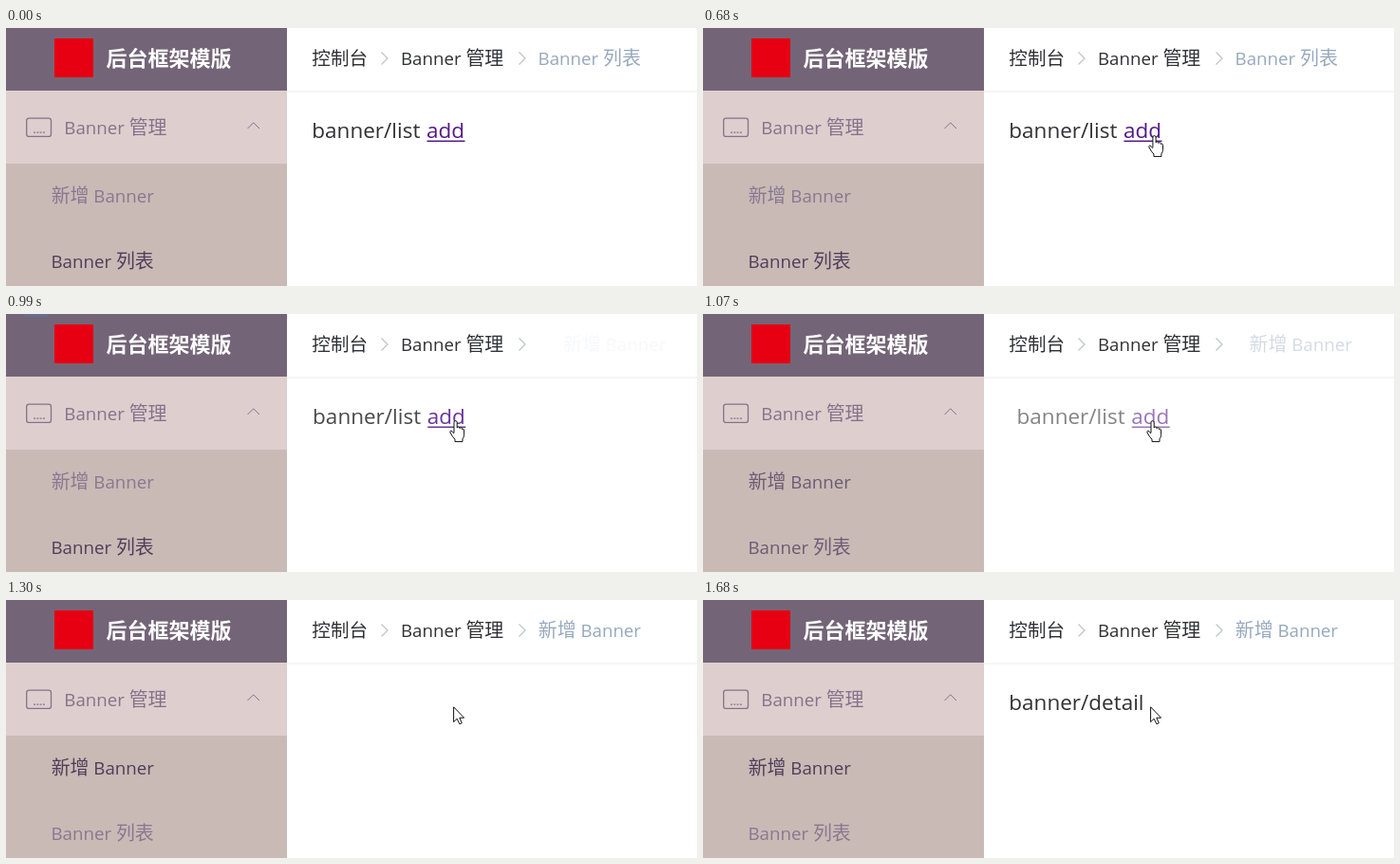
An HTML page that plays this animation: 728 px wide and 272 px high, repeating every 2.06 s.

```html
<!DOCTYPE html>
<html lang="zh">
<head>
<meta charset="utf-8">
<style>
  html, body { margin: 0; width: 100%; height: 100%; overflow: hidden; background: #fff; }
  svg { display: block; width: 728px; height: 272px; }
  text { font-family: "Open Sans", "Noto Sans", "Noto Sans CJK SC", "Noto Sans CJK", sans-serif; white-space: pre; }
</style>
</head>
<body>
<svg viewBox="0 0 728 272">
  <rect width="296" height="272" fill="#c9bab6"/>
  <rect width="296" height="143" fill="#decece"/>
  <rect width="296" height="66" fill="#736577"/>
  <rect x="296" y="66" width="432" height="2" fill="#f4f5f6"/>
  <rect id="bar" x="19" width="26" height="3" fill="#4f7fb5"/>
  <rect x="51" y="11" width="41" height="41" fill="#e60012"/>
  <g fill="none" stroke="#84738a" stroke-width="1.3">
    <rect x="21.7" y="95.2" width="25.8" height="19.2" rx="2.5"/>
    <path d="M29 110.2H41" stroke-dasharray="2 1.3"/>
    <path d="M254.5 106L260.7 99.8L267 106" stroke-width="1"/>
  </g>
  <path d="M395.5 25.5L402 32L395.5 38.5M540.5 25.5L547 32L540.5 38.5" fill="none" stroke="#c0c4cc" stroke-width="1.3"/>
  <g id="labels"></g>
  <g id="list"><rect x="443.5" y="118.5" width="40" height="1.5" fill="#551a8b"/></g>
  <g id="detail"></g>
  <g id="cursor" fill="#fff" stroke="#111" stroke-linejoin="round">
    <path id="arrow" d="M.6 .8V16.6L4.2 13.2L6.9 18.8L9.3 17.7L6.8 12.2H11.6Z"/>
    <path id="hand" d="M5 13V2.2Q5 .7 6.6 .7Q8.2 .7 8.2 2.2V8Q8.6 6.8 9.8 7Q11 7.1 11 8.6Q11.5 7.5 12.6 7.9Q13.5 8.2 13.5 9.6Q14.2 8.8 15 9.3Q15.6 9.8 15.6 11V15.5Q15.5 18 14 19.8V22.6H6V20.2Q3.6 17.8 1 13Q.4 11.5 1.7 11.1Q3 10.9 5 14"/>
  </g>
</svg>
<script>
const NS = 'http://www.w3.org/2000/svg';
const $ = id => document.getElementById(id);

function make(parent, tag, attrs) {
  const el = document.createElementNS(NS, tag);
  for (const k in attrs) el.setAttribute(k, attrs[k]);
  parent.append(el);
  return el;
}

// Latin runs are slightly smaller and heavier than the CJK glyphs beside them.
function label(x, y, str, fill, size = 19.9, weight = 400) {
  const el = make($('labels'), 'text', { x, y, fill, 'font-size': size, 'font-weight': weight });
  for (const run of str.match(/[\x20-\x7e]+|[^\x20-\x7e]+/g)) {
    const latin = run.charCodeAt(0) < 127;
    make(el, 'tspan', latin ? { 'font-size': size * 0.94, 'font-weight': 500 } : {}).textContent = run;
  }
  return el;
}

function content(parent, x, str, fill) {
  make($(parent), 'text', { x, y: 116.4, fill, 'font-size': 22.5 }).textContent = str;
}

const INK = '#303133', CRUMB = '#97a8be', IDLE = '#84738a';
label(105.5, 39.7, '后台框架模版', '#fff', 22, 700);
label(61.3, 112, 'Banner 管理', IDLE);
label(322.3, 39, '控制台', INK, 19.6);
label(416, 39, 'Banner 管理', INK);
const addItem = label(47.7, 184, '新增 Banner', IDLE);
const listItem = label(47.5, 253, 'Banner 列表', IDLE);
const oldCrumb = label(560.6, 39, 'Banner 列表', CRUMB);
const newCrumb = label(560.8, 39, '新增 Banner', CRUMB);
content('list', 322.3, 'banner/list', INK);
content('list', 443, 'add', '#551a8b');
content('detail', 322.3, 'banner/detail', INK);

const LOOP = 2060;
const clamp = v => Math.min(1, Math.max(0, v));
const smooth = p => p * p * (3 - 2 * p);
const mix = (a, b, p) => a + (b - a) * p;

// Index of the held picture within a phase; -1 before it begins.
const beat = (t, start, step, last) => t < start ? -1 : Math.min(last, Math.floor((t - start) / step));

function place(el, x, y, alpha) {
  el.setAttribute('transform', `translate(${x} ${y})`);
  el.setAttribute('opacity', clamp(alpha));
}

function tint(el, active) {
  const [r, g, b] = [[136, 78], [120, 62], [144, 88]].map(([from, to]) => Math.round(mix(from, to, active)));
  el.setAttribute('fill', `rgb(${r},${g},${b})`);
}

function draw(t) {
  const move = beat(t, 350, 80, 6);
  const swap = beat(t, 910, 76, 6);
  const enter = beat(t, 1448, 76, 3);

  // The pointer glides in, turns into a hand near the link and back once the link is gone.
  const glide = 1 - (1 - clamp(move / 6)) ** 4;
  const overLink = move >= 3 && swap < 5;
  const back = swap < 5 ? 0 : 4;
  place($('cursor'), mix(623, 467, glide) + back, mix(180, 112, glide), t >= 380);
  $('hand').setAttribute('visibility', overLink ? 'visible' : 'hidden');
  $('arrow').setAttribute('visibility', overLink ? 'hidden' : 'visible');

  const crumbIn = clamp((swap - 0.8) / 4.2);
  place(oldCrumb, 4 * (swap + 1), 0, 1 - (swap + 1) / 2);
  place(newCrumb, 29 * (1 - crumbIn) ** 2, 0, 1.45 * crumbIn);

  const leave = clamp((swap - 0.6) / 5);
  place($('list'), 43 * smooth(leave), 0, 1 - 1.45 * leave);

  const arrive = (enter + 1) / 4;
  place($('detail'), -43 * (1 - arrive) ** 3, 0, 1.5 * arrive);

  const active = clamp((swap - 1) / 2);
  tint(addItem, active);
  tint(listItem, 1 - active);
  place($('bar'), 0, 0, swap < 0 ? 0 : 0.6 - 0.3 * swap);
}

const start = performance.now();
function tick() {
  draw((performance.now() - start) % LOOP);
  requestAnimationFrame(tick);
}
tick();
</script>
</body>
</html>
```
